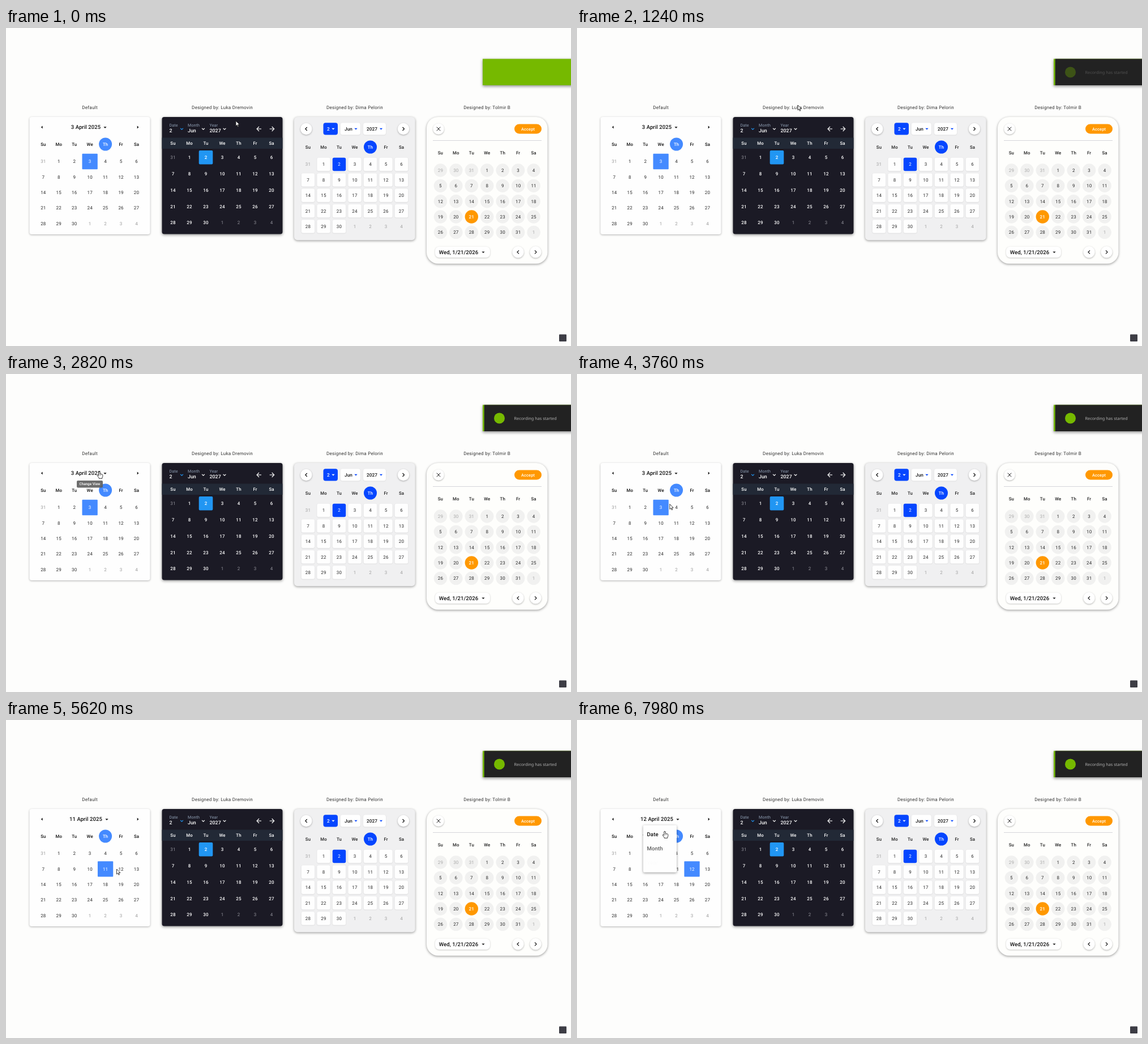
These frames come from a looping animation (998x561 px, 8 s). An HTML page with a canvas:

```html
<!DOCTYPE html>
<html lang="en">
<head>
<meta charset="utf-8">
<title>Date pickers</title>
<style>
html, body { margin: 0; width: 100%; height: 100%; overflow: hidden; background: #fdfdfc; }
canvas { display: block; }
</style>
</head>
<body>
<canvas id="stage" width="998" height="561"></canvas>
<script>
const ctx = document.getElementById('stage').getContext('2d');
const LOOP = 8000;
const BLUE = '#448aff', ROYAL = '#0546ff', SKY = '#2196f3', ORANGE = '#ff9800', GREEN = '#76b900';
const DAYS = ['Su', 'Mo', 'Tu', 'We', 'Th', 'Fr', 'Sa'];

// Pointer tip: time, x, y
const PATH = [
  [0, 406, 164], [500, 406, 164], [1240, 390, 136], [1660, 386, 134],
  [2300, 165, 172], [3380, 165, 172], [4060, 163, 269.5], [5040, 163, 269.5],
  [5620, 195.5, 263], [5760, 201, 265], [6180, 201, 265], [6800, 124, 172],
  [7020, 141.5, 177], [7740, 141.5, 177], [7980, 155, 196], [8000, 155, 196]
];
const FIRST_PICK = 4480, SECOND_PICK = 5700, MENU_OPEN = 7780;

const clamp = v => Math.max(0, Math.min(1, v));
const span = (t, from, to) => clamp((t - from) / (to - from));
const smooth = p => p * p * (3 - 2 * p);

function text(str, x, y, size, color = '#222', weight = 400, align = 'center', spacing = 0.15, family = 'Roboto') {
  ctx.font = `${weight} ${size}px ${family}, sans-serif`;
  ctx.letterSpacing = spacing + 'px';
  ctx.textAlign = align;
  ctx.fillStyle = color;
  ctx.fillText(str, x, y + size * 0.355);
}

function box(x, y, w, h, r, color, blur = 0, drop = 1, shade = 0.3) {
  ctx.save();
  if (blur) {
    ctx.shadowColor = `rgba(0,0,0,${shade})`;
    ctx.shadowBlur = blur;
    ctx.shadowOffsetY = drop;
  }
  ctx.fillStyle = color;
  ctx.beginPath();
  ctx.roundRect(x, y, w, h, r);
  ctx.fill();
  ctx.restore();
}

const disc = (x, y, r, color, blur) => box(x - r, y - r, 2 * r, 2 * r, r, color, blur);
const square = (x, y, size, r, color, blur) =>
  box(x - size / 2, y - size / 2, size, size, r, color, blur, 0.5, 0.12);

function poly(points, color) {
  ctx.fillStyle = color;
  ctx.beginPath();
  points.forEach(([x, y]) => ctx.lineTo(x, y));
  ctx.fill();
}

function line(points, color, width = 1.2) {
  ctx.strokeStyle = color;
  ctx.lineWidth = width;
  ctx.beginPath();
  points.forEach(([x, y], i) => i ? ctx.lineTo(x, y) : ctx.moveTo(x, y));
  ctx.stroke();
}

const caret = (x, y, color = '#111') => poly([[x - 2.6, y - 1.3], [x + 2.6, y - 1.3], [x, y + 1.4]], color);
const sideCaret = (x, y, dir) => poly([[x - dir * 1.3, y - 2.6], [x - dir * 1.3, y + 2.6], [x + dir * 1.4, y]], '#111');
const chevronDown = (x, y, color) => line([[x - 2.4, y - 1.2], [x, y + 1.2], [x + 2.4, y - 1.2]], color);
const chevronSide = (x, y, dir) => line([[x - dir * 1.5, y - 3], [x + dir * 1.5, y], [x - dir * 1.5, y + 3]], '#111', 1.2);

function arrow(x, y, dir) {
  line([[x - dir * 4, y], [x + dir * 3.8, y]], '#fff', 1.1);
  line([[x, y - 4], [x + dir * 4, y], [x, y + 4]], '#fff', 1.1);
}

function roundButton(x, y, dir) {
  disc(x, y, 10.2, '#fff', 3);
  chevronSide(x, y, dir);
}

function weekdays(x, y, step, color, marked, mark) {
  DAYS.forEach((day, i) => {
    const on = i === marked;
    if (on) disc(x + i * step, y, 11.5, mark);
    text(day, x + i * step, y, 7.8, on ? '#fff' : color, 500);
  });
}

// Five weeks; lead = days shown from the month before
function month(x, y, dx, dy, lead, length, draw) {
  for (let i = 0; i < 35; i++) {
    const n = i - lead + 1;
    const out = n < 1 || n > length;
    const label = n < 1 ? 31 + n : n > length ? n - length : n;
    draw(label, x + (i % 7) * dx, y + Math.floor(i / 7) * dy, out);
  }
}

function plainCard(day) {
  text('Default', 148, 140.5, 8.1, '#333', 400, 'center', 0.25);
  box(41.5, 157, 213, 207, 4, '#fefefe', 3.5, 1);
  const shift = day > 9 ? 3 : 0;
  text(day + ' April 2025', 141, 175, 9.5, '#111', 500, 'center', 0.08);
  caret(175 + shift, 175.5);
  sideCaret(63.3, 175, -1);
  sideCaret(233, 175, 1);
  weekdays(65.8, 205, 27.45, '#111', 4, BLUE);
  month(65.8, 235.5, 27.45, 27.35, 1, 30, (n, x, y, out) => {
    const on = n === day && !out;
    if (on) square(x, y, 27.3, 1, BLUE);
    text(n, x, y, 8, on ? '#fff' : out ? '#9a9a9a' : '#282828');
  });
}

function darkCard() {
  text('Designed by: Luka Dremovin', 382, 140.5, 8.1, '#333', 400, 'center', 0.25);
  box(275.5, 157, 213, 206.5, 4, '#1b1a25', 5, 1.5, 0.45);
  box(275.5, 193.5, 213, 19.5, 0, '#222936');
  [['Date', '2', 288.5, 310.5], ['Month', 'Jun', 321, 348.5], ['Year', '2027', 359.5, 386]].forEach(([label, value, x, icon], i) => {
    text(label, x, 171, 7.2, '#8f9fb4', 400, 'left', 0.1);
    text(value, x, 181, 8.8, '#fff', 500, 'left', 0.05);
    chevronDown(icon, 178, i ? '#fff' : SKY);
  });
  arrow(447, 178, -1);
  arrow(469.7, 178, 1);
  weekdays(295, 203, 29, '#fff', -1);
  month(295, 228.2, 29, 28.85, 1, 30, (n, x, y, out) => {
    const on = n === 2 && !out;
    if (on) square(x, y, 24.6, 2, SKY);
    text(n, x, y, 8, out ? '#92929a' : '#fff', out ? 400 : 500);
  });
}

function softCard() {
  text('Designed by: Dima Pelorin', 616, 140.5, 8.1, '#333', 400, 'center', 0.25);
  box(509, 157, 213.7, 217.3, 6, '#f0f0f1', 4, 1.2, 0.4);
  roundButton(530.3, 178, -1);
  roundButton(702, 178, 1);
  [['2', 560.5, 25.5, 569.5, 578], ['Jun', 590.7, 35.3, 605, 618], ['2027', 631, 40, 646.5, 662.5]].forEach(([label, x, w, tx, icon], i) => {
    box(x, 167.3, w, 21.2, 4, i ? '#fff' : ROYAL, i ? 2 : 0, 0.5, 0.12);
    text(label, tx, 178, 8.2, i ? '#111' : '#fff', 500);
    caret(icon, 178, i ? ROYAL : '#fff');
  });
  weekdays(533.5, 210, 27.5, '#222', 4, ROYAL);
  month(533.5, 240.5, 27.5, 27.4, 1, 30, (n, x, y, out) => {
    const on = n === 2 && !out;
    if (!out) square(x, y, 23.5, 3, on ? ROYAL : '#fefefe', on ? 0 : 2);
    text(n, x, y, 8, on ? '#fff' : out ? '#a0a0a0' : '#282828');
  });
}

function roundCard() {
  text('Designed by: Tolmir B', 849.7, 140.5, 8.1, '#333', 400, 'center', 0.25);
  box(743, 157, 213.5, 258.7, 20, '#fefefc', 4, 1.2, 0.4);
  disc(764, 178, 9.8, '#fff', 2.5);
  line([[760.7, 174.7], [767.3, 181.3]], '#222', 1);
  line([[767.3, 174.7], [760.7, 181.3]], '#222', 1);
  box(898, 169.5, 48, 17, 8.5, ORANGE);
  text('Accept', 922, 178, 7.4, '#fff', 500);
  box(754, 198, 192, 1, 0, '#d5d5da');
  weekdays(767.4, 220, 27.45, '#222', -1);
  month(767.4, 251, 27.45, 27.35, 3, 31, (n, x, y, out) => {
    const on = n === 21;
    disc(x, y, 11.7, on ? ORANGE : '#f1f1f0');
    text(n, x, y, 8, on ? '#fff' : out ? '#a8a8a8' : '#282828', on ? 500 : 400);
  });
  box(758, 385.8, 97, 19.2, 7, '#fff', 2.5, 0.7, 0.25);
  text('Wed, 1/21/2026', 799.5, 395.3, 9.5, '#111', 500, 'center', 0.08);
  caret(843, 395.7);
  roundButton(904.5, 395.3, -1);
  roundButton(935.5, 395.3, 1);
}

function notice(t) {
  box(842, 54.5, 160, 46.5, 0, GREEN, 5, 1.5, 0.45);
  const slide = 1 - (1 - span(t, 200, 800)) ** 3;
  box(998 - 153.3 * slide, 54.5, 160, 46.5, 0, '#222');
  ctx.globalAlpha = span(t, 950, 1830);
  disc(871.5, 78, 9.5, GREEN);
  text('Recording has started', 897.5, 78, 7.3, '#b0b0b0', 400, 'left', 0, 'Noto Sans');
  ctx.globalAlpha = 1;
}

function tooltip(t) {
  const show = span(t, 2250, 2400) * (1 - span(t, 3480, 3560)) + span(t, 6760, 6900) * (1 - span(t, 7740, 7820));
  if (!show) return;
  ctx.globalAlpha = show;
  box(125, 188, 46, 12.5, 2, 'rgba(97,97,97,.92)');
  text('Change View', 148, 194.2, 6.3, '#fff', 500, 'center', 0.02);
  ctx.globalAlpha = 1;
}

// Panel grows first, rows fade in one after another
function menu(t) {
  const p = (t - MENU_OPEN) / 300;
  if (p <= 0) return;
  ctx.globalAlpha = clamp(p * 3);
  box(117, 185.5, 59 * clamp(p / 0.222), 83.3 * clamp(p / 0.667), 2, '#fefefe', 4, 1.2, 0.4);
  ['Date', 'Month', 'Year'].forEach((label, i) => {
    ctx.globalAlpha = clamp((p - (i + 1) * 0.222) / 0.333);
    text(label, 123.5, 202 + i * 25, 9.6, '#111', 500, 'left', 0.1);
  });
  ctx.globalAlpha = 1;
}

const ARROW = new Path2D('M0 0V9L2.1 7.1 3.5 10.3 4.9 9.7 3.5 6.6 6.4 6.5Z');
const HAND = new Path2D('M-1.2 1Q0-.8 1.2 1V4.2Q2.4 3.3 3 4.6 4.2 3.9 4.6 5.2 5.8 4.9 5.8 6.4V8.5Q5.6 10 4.8 11V12.3H-.8V11.2L-3.6 7.7Q-4 6-2.6 6.4L-1.2 7.6Z');

function pointer(t) {
  const i = PATH.findIndex(k => k[0] > t);
  const [t0, x0, y0] = PATH[i - 1], [t1, x1, y1] = PATH[i];
  const p = smooth(span(t, t0, t1));
  const x = x0 + (x1 - x0) * p, y = y0 + (y1 - y0) * p;
  const overTitle = x > 105 && x < 187 && y > 164 && y < 186;
  const shape = overTitle || t > MENU_OPEN ? HAND : ARROW;
  ctx.save();
  ctx.translate(x, y);
  ctx.lineWidth = 0.9;
  ctx.lineJoin = 'round';
  ctx.fillStyle = '#fff';
  ctx.strokeStyle = '#222';
  ctx.fill(shape);
  ctx.stroke(shape);
  if (shape === HAND) line([[1.2, 4], [1.2, 6.5], [3, 6.5], [3, 4.8]], '#222', 0.4);
  ctx.restore();
}

function draw() {
  const t = performance.now() % LOOP;
  ctx.textRendering = 'geometricPrecision';
  ctx.fillStyle = '#fdfdfc';
  ctx.fillRect(0, 0, 998, 561);
  plainCard(t < FIRST_PICK ? 3 : t < SECOND_PICK ? 11 : 12);
  darkCard();
  softCard();
  roundCard();
  notice(t);
  box(977, 540.5, 13, 12.5, 1, '#3d3d45');
  tooltip(t);
  menu(t);
  pointer(t);
  requestAnimationFrame(draw);
}
requestAnimationFrame(draw);
</script>
</body>
</html>
```
